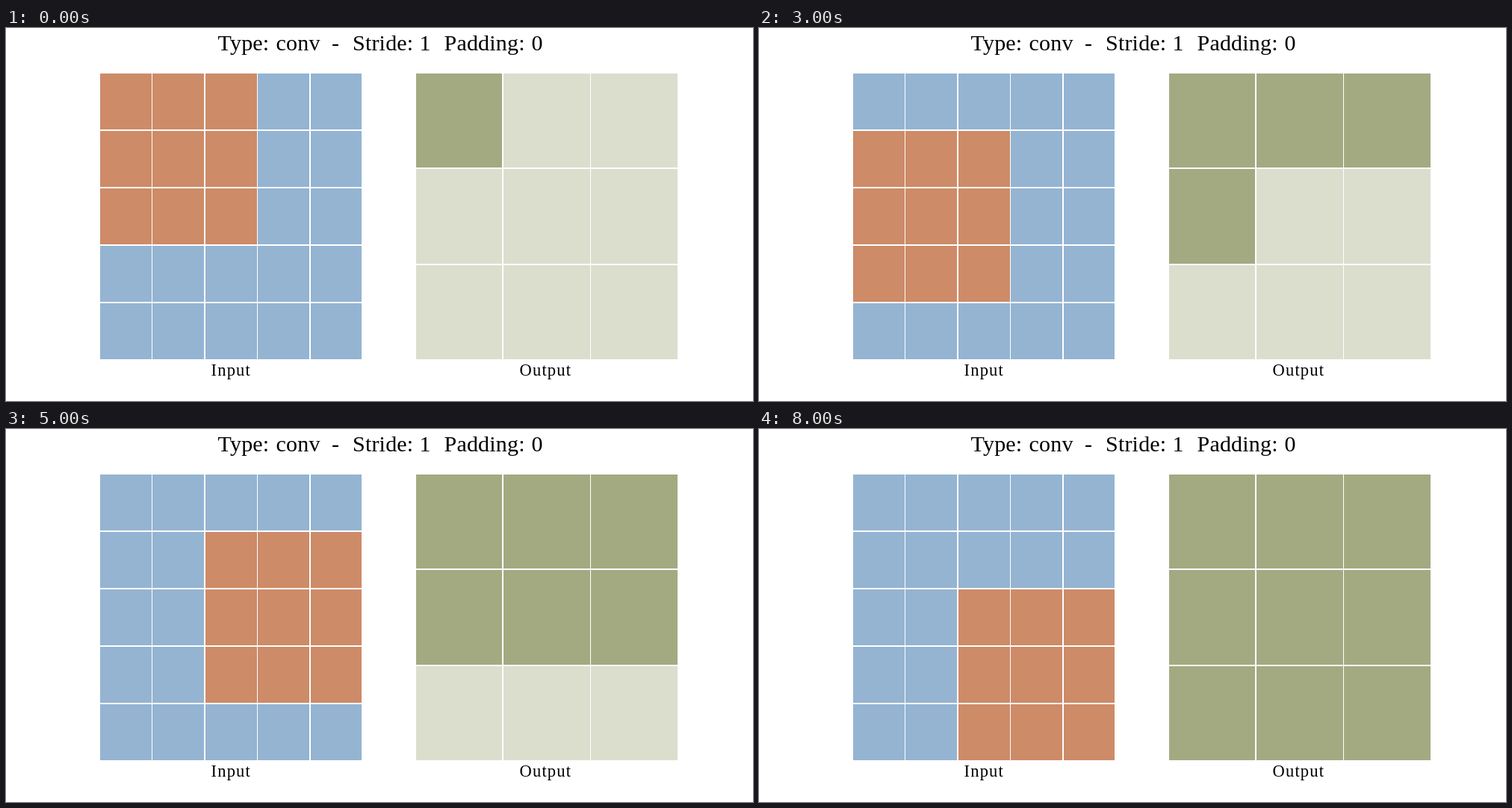
An HTML page that plays this animation: 1000 px wide and 500 px high, repeating every 9000 ms.

```html
<!DOCTYPE html>
<html lang="en">
<head>
<meta charset="utf-8">
<title>Convolution: stride 1, padding 0</title>
<style>
  html, body { margin: 0; width: 100%; height: 100%; overflow: hidden; background: #fff; }
  svg { display: block; }
  #stage { width: 100%; height: 100%; }

  text { font-family: "Liberation Serif", serif; fill: #000; }
  .title { font-size: 30px; letter-spacing: .2px; }
  .label { font-size: 22.5px; letter-spacing: 1.2px; }

  .input { fill: #94b4d2; }
  .kernel { fill: #cd8b68; }
  .empty { fill: #dbdecd; }
  .filled { fill: #a3aa81; }
  .lines { fill: none; stroke: #fff; }
  .thick { stroke-width: 2; }

  /* Columns advance every second, rows every three. */
  .column { animation: column 3s steps(3) infinite; }
  .row { animation: row 9s steps(3) infinite; }
  @keyframes column { to { transform: translateX(var(--travel)); } }
  @keyframes row { to { transform: translateY(var(--travel)); } }

  .kernel-column { --travel: 210px; }
  .kernel-row { --travel: 231px; }
  .output-column { --travel: 351px; }
  .output-row { --travel: 384px; }
</style>
</head>
<body>
<svg id="stage" viewBox="0 0 1000 500">
  <g class="title">
    <text x="283.5" y="30">Type:</text>
    <text x="361.5" y="30">conv</text>
    <text x="436" y="30">-</text>
    <text x="464" y="30">Stride:</text>
    <text x="553.5" y="30">1</text>
    <text x="586.5" y="30">Padding:</text>
    <text x="703.5" y="30">0</text>
  </g>

  <svg x="126" y="61" width="350" height="383">
    <rect class="input" width="350" height="383"/>
    <g class="row kernel-row">
      <rect class="kernel column kernel-column" width="210" height="229"/>
    </g>
    <path class="lines" d="M69.5 0v383M210.5 0v383"/>
    <path class="lines thick" d="M140 0v383M281 0v383M0 76h350M0 153h350M0 230h350M0 307h350"/>
  </svg>

  <svg x="549" y="61" width="350" height="383">
    <rect class="empty" width="350" height="383"/>
    <g class="row output-row">
      <rect class="filled" y="-384" width="350" height="384"/>
      <rect class="filled column output-column" x="-234" width="351" height="128"/>
    </g>
    <path class="lines" d="M233.5 0v383"/>
    <path class="lines thick" d="M116 0v383M0 127h350M0 256h350"/>
  </svg>

  <g class="label">
    <text x="274.5" y="466">Input</text>
    <text x="687.5" y="466">Output</text>
  </g>
</svg>
</body>
</html>
```
